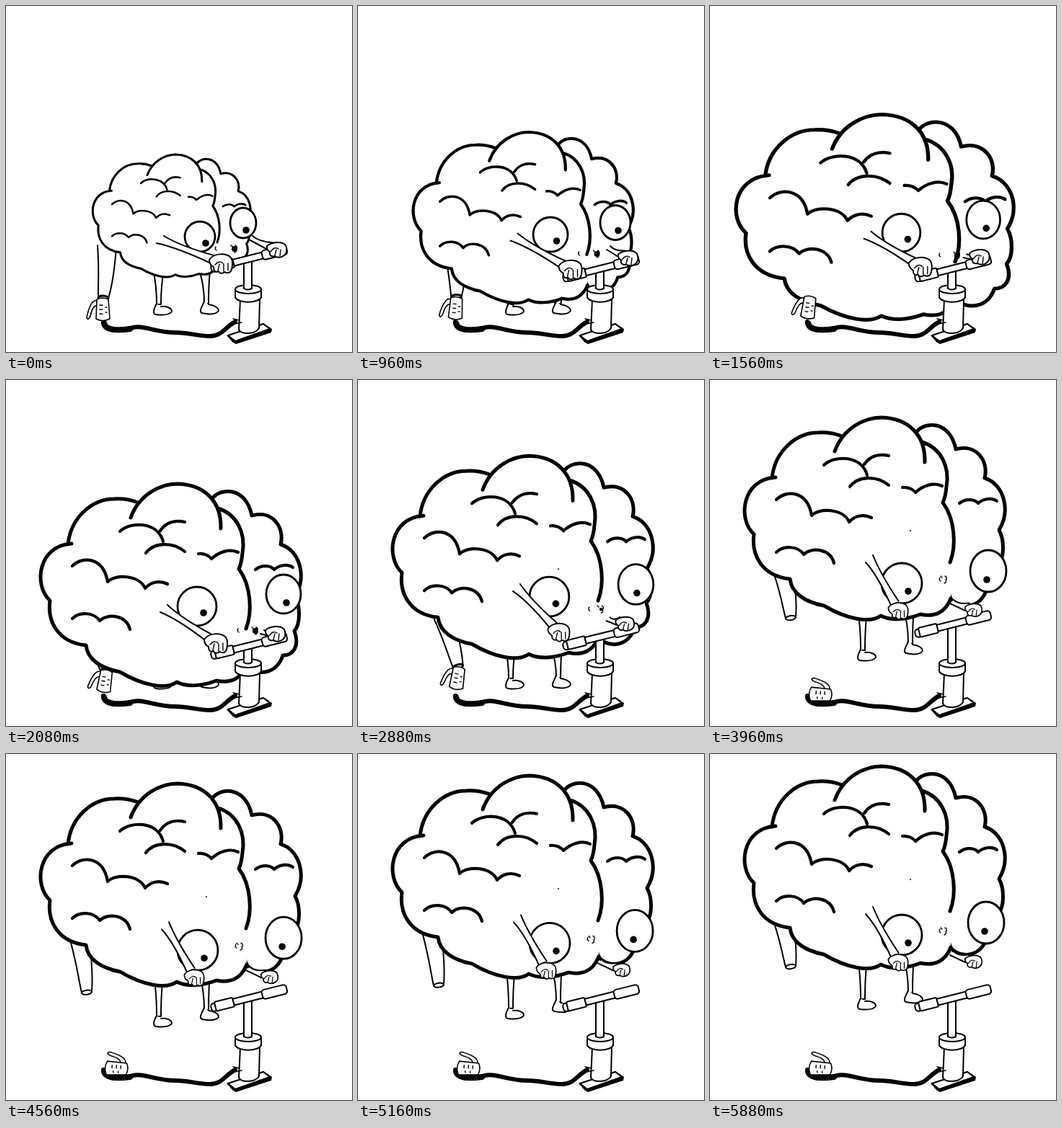
An HTML page for the animation above (6 s loop, 480 by 480 pixels).

```html
<!DOCTYPE html>
<html lang="en">
<head>
<meta charset="utf-8">
<title>Brain pump</title>
<style>
  html, body { margin: 0; width: 100%; height: 100%; overflow: hidden; background: #fff; }
  svg { display: block; width: 100vw; height: 100vh; fill: #fff; stroke: #000; stroke-width: 2;
        stroke-linecap: round; stroke-linejoin: round; }
  #brain { stroke-width: 5; }
  .fold { fill: none; stroke-width: 4.2; }
  .line { fill: none; }
  .thin { fill: none; stroke-width: 1.4; }
  .ink { fill: #000; stroke: none; }
</style>
</head>
<body>
<svg viewBox="0 0 480 480">
  <g id="legL"><path id="shinL"/><path d="M209 -15C205 -8 203 -1 208 0C216 1 226 1 230 -4C230 -9 223 -12 215 -11"/></g>
  <g id="legR"><path id="shinR"/><path d="M275 -17C272 -10 267 -3 272 -1C281 1 291 1 295 -4C295 -9 288 -12 281 -13"/></g>

  <path id="stem"/>
  <ellipse id="cap" rx="7" ry="3"/>

  <g id="brain">
    <path d="M285 166C297 148 333 148 341 188C370 180 387 205 381 228C407 236 418 272 401 300C409 315 408 340 400 348C408 370 398 382 384 382C376 408 348 412 334 396L300 300Z"/>
    <path stroke="none" d="M87 228C90 190 120 165 150 165L183 170C195 152 215 144 238 144C268 145 290 160 296 178C320 186 333 212 328 240L323 262C340 285 342 322 333 347L334 395L292 417L237 419L158 405L111 368L61 306Z"/>
    <path d="M334 395C326 416 310 421 292 417C272 425 250 426 237 419C222 430 190 424 158 405C132 400 113 388 111 368C72 364 57 335 61 306C38 285 44 230 91 227L183 170"
      stroke="none"/>
    <path class="line" d="M334 395C326 416 310 421 292 417C272 425 250 426 237 419C222 430 190 424 158 405C132 400 113 388 111 368C72 364 57 335 61 306C38 285 44 230 91 227M86 228C90 190 120 165 150 165C165 164 175 167 183 170M158 405L148 403"/>
    <path class="line" d="M173 191C185 158 215 144 238 144C275 145 299 168 298 206M294 178C320 186 333 212 328 240C327 252 325 258 323 262C340 285 342 322 333 345"/>
    <path class="fold" d="M158 210C173 196 210 196 218 224M214 209C222 197 235 194 248 197M194 240C205 225 231 224 248 238M267 241C275 240 282 244 285 248C295 239 310 233 322 239"/>
    <path class="fold" d="M92 258C106 244 135 245 141 280C151 269 185 270 193 289C200 281 212 277 224 283M92 331C102 321 122 322 130 334C141 323 167 326 172 346M346 263C355 256 367 257 372 263C380 256 392 255 398 260"/>
    <circle class="ink" cx="278" cy="301" r="1"/>
  </g>

  <path class="line" stroke-width="6" d="M135 438C134 450 155 453 172 447C190 441 205 453 235 453C255 453 265 458 283 458C300 458 303 446 318 438"/>
  <path class="line" stroke-width="8" d="M136 440C138 451 158 450 172 448"/>

  <g id="nozzle" stroke-width="1.6">
    <path d="M-8 -12C-14 -14 -19 -4 -22 11C-21 15 -18 13 -17 9C-15 -1 -12 -6 -7 -5Z"/>
    <path d="M-8 -14Q0 -18 8 -14L10 13Q0 18 -9 13Z"/>
    <path class="thin" d="M-4 -6h4M-4 0h4M-4 6h4M4 -3h2M4 4h2"/>
  </g>

  <path class="ink" d="M306 457L357 440L369 448L368 453L319 469L315 467Z"/>
  <path d="M308 457L357 441L366 448L318 465Z"/>
  <path d="M325 407L323 449C328 457 346 455 351 447L352 407Z"/>
  <path class="thin" d="M315 434L324 436M317 441L327 439"/>
  <path d="M318 393V404C322 413 350 413 354 404V393Z"/>
  <ellipse cx="336" cy="393" rx="18" ry="6"/>
  <path id="rod"/>
  <g id="handle">
    <rect x="-53" y="-5" width="32" height="11" rx="4"/>
    <rect x="-47" y="-6.5" width="26" height="13" rx="2"/>
    <rect x="-21" y="-4.5" width="42" height="9"/>
    <rect x="20" y="-6.5" width="35" height="13" rx="4"/>
  </g>

  <g id="upper">
    <g id="eyeL"><ellipse id="ballL" stroke-width="2.8"/><circle id="pupilL" class="ink" r="4.8"/></g>
    <g id="eyeR"><ellipse id="ballR" stroke-width="2.8"/><circle id="pupilR" class="ink" r="4.8"/></g>
    <path id="nose" class="thin" d="M0 -3q-2 3 1 5"/>
    <g id="mouth">
      <path class="thin" d="M-5 -5l2 2M1 -5Q5 -3 2 1Q4 3 0 5"/>
      <circle id="lips" class="ink"/>
    </g>
    <path id="armR" stroke="none"/><path id="armRLine" class="line"/>
    <path id="armL" stroke="none"/><path id="armLLine" class="line"/>
    <g id="handL">
      <path d="M-16 -5C-10 -14 6 -15 13 -9C18 -4 16 7 14 11C10 15 7 13 5 12C2 15 -2 14 -3 11C-8 13 -10 10 -10 5Q-16 2 -16 -5Z"/>
      <path class="thin" d="M-8 2Q-2 -5 3 0M-4 10L-2 1M4 11L4 1M10 10L10 0"/>
    </g>
    <g id="handR">
      <path d="M-13 -5C-6 -11 8 -12 13 -6C16 0 14 6 11 8C6 12 0 11 -2 9C-9 11 -10 5 -9 3Q-14 0 -13 -5Z"/>
      <path class="thin" d="M-8 3Q-3 -5 3 -1M-2 8L0 0M5 9L6 0"/>
    </g>
  </g>
</svg>
<script>
const $ = id => document.getElementById(id);
const set = (id, attrs) => { for (const a in attrs) $(id).setAttribute(a, attrs[a]); };
const move = (id, x, y, rest = '') => set(id, { transform: `translate(${x} ${y}) ${rest}` });

const ramp = (k, from, to) => Math.min(1, Math.max(0, (k - from) / (to - from)));
const smooth = (k, from, to) => { const u = ramp(k, from, to); return u * u * (3 - 2 * u); };
const mix = (a, b, u) => a + (b - a) * u;

function unit(x0, y0, x1, y1) {
  const len = Math.hypot(x1 - x0, y1 - y0) || 1;
  const dx = (x1 - x0) / len, dy = (y1 - y0) / len;
  return { dx, dy, nx: dy, ny: -dx, len };
}

function eye(side, [x, y, rx, ry, px, py]) {
  move('eye' + side, x, y);
  set('ball' + side, { rx, ry });
  set('pupil' + side, { cx: px, cy: py });
}

// Two lines from the shoulder (x, y) to the wrist, then the hand
function arm(side, [x, y, hx, size], hy, gap, wide) {
  const f = unit(x, y, hx, hy);
  const wx = hx - f.dx * gap, wy = hy - f.dy * gap;
  const bx = mix(x, wx, .35), by = mix(y, wy, .35);
  const top = `M${x} ${y}Q${bx} ${by + 3} ${wx + f.nx * 6} ${wy + f.ny * 6}`;
  const low = `${wx - f.nx * 6} ${wy - f.ny * 6}Q${bx - 4} ${by + 5} ${x - wide} ${y + wide}`;
  set('arm' + side, { d: top + 'L' + low + 'Z' });
  set('arm' + side + 'Line', { d: top + 'M' + low });
  move('hand' + side, hx, hy, `scale(${size})`);
}

function leg(side, hip, foot, left, ankle) {
  const top = hip - foot, knee = top + 20;
  move('leg' + side, 0, foot);
  set('shin' + side, { d: `M${left} ${top}Q${ankle} ${knee} ${ankle} -14h6Q${ankle + 6} ${knee} ${left + 15} ${top}` });
}

function stem(x, y, tx, ty, ring) {
  const f = unit(x, y, tx, ty);
  const p = (along, off) => `${mix(x, tx, along) + f.nx * off} ${mix(y, ty, along) + f.ny * off}`;
  set('stem', { d: `M${p(0, 13)}C${p(.4, 13)} ${p(.7, 12)} ${p(1, 7)}L${p(1, -7)}C${p(.7, -9)} ${p(.5, -8)} ${p(0, -13)}` });
  const turn = Math.atan2(f.ny, f.nx) * 180 / Math.PI;
  set('cap', { transform: `translate(${tx} ${ty}) rotate(${turn})`, 'stroke-width': ring });
}

function draw(k) {
  const grow = smooth(k, 0, 20), rise = ramp(k, 21, 40), drift = ramp(k, 40, 59);
  const free = smooth(k, 31, 36);
  const stroke = (1 - Math.cos(Math.PI * Math.min(k, 21) / 3)) / 2;
  // Blend of the small, the inflated and the floating pose
  const pose = (small, full, afloat) => small.map((v, i) => mix(mix(v, full[i], grow), afloat[i], rise));

  const size = mix(.606, 1, smooth(k, 2, 16));
  const bulge = Math.sin(Math.PI * ramp(k, 14, 21));
  const top = 206 - 62 * grow - 92 * rise - 35 * drift;
  move('brain', 230 - grow, top, `scale(${size + .085 * bulge} ${size + .02 * bulge}) translate(-229 -144)`);

  const hip = top + 265 * size;
  leg('L', hip, Math.min(428, top + 337), 204, 209);
  leg('R', hip, Math.min(427, top + 328), 268, 275);

  const [rootX, rootY, tipX, tipY, tilt] = pose([140, 333, 135, 405, 0], [130, 372, 138, 402, 10], [102, 268, 140, 392, 10]);
  const hang = top + 278 + 14 * Math.sin(Math.PI * drift);
  stem(rootX, rootY - 35 * drift, mix(tipX, 112, free), mix(tipY, hang, free), 3 - free);
  move('nozzle', mix(tipX - 1, 153, free), mix(tipY + 16, 436, free), `rotate(${mix(tilt, 94, free)})`);

  const bar = 351 + 18 * stroke - 30 * rise;
  set('rod', { d: `M330 ${bar}V392Q335 395 341 392V${bar}` });
  move('handle', 336, bar, 'rotate(-14)');

  move('upper', 0, -31 * drift);
  eye('L', pose([269, 320, 21, 21, 8, 9], [265, 314, 27, 27, 9, 9], [266, 282, 28, 28, 9, 11]));
  const right = pose([329, 301, 18, 21, 4, 10], [385, 291, 24, 27, 4, 12], [386, 259, 25, 29, -2, 12]);
  right[1] += 6 * stroke;
  right[0] -= 3 * drift;
  eye('R', right);

  const [mx, my, open, gap] = pose([317, 337, 4, 26], [346, 342, 4, 24], [325, 271, 0, 6]);
  move('mouth', mx, my + 6 * stroke);
  move('nose', mx - gap, my + 6 * stroke);
  set('lips', { r: open });

  // Hands ride on the bar until they let go
  arm('R', pose([342, 319, 375, 1], [358, 347, 373, 1], [338, 305, 365, .85]), bar - 13 - 4 * grow - 3 * rise, 9, 5);
  arm('L', pose([219, 319, 298, 1], [224, 312, 291, 1], [226, 243, 261, .85]), bar + 6 - 10 * grow - 15 * rise * rise, 12, 10);
}

// Ten steps a second, shown on a 40 ms clock
const LOOP = 6000, STEPS = 60, TICK = 40;
let last = -1;
function tick(now) {
  const n = Math.floor(now % LOOP / TICK);
  const k = Math.min(STEPS - 1, Math.floor(2 * (n + 1) / 5));
  if (k !== last) draw(last = k);
  requestAnimationFrame(tick);
}
tick(performance.now());
</script>
</body>
</html>
```
